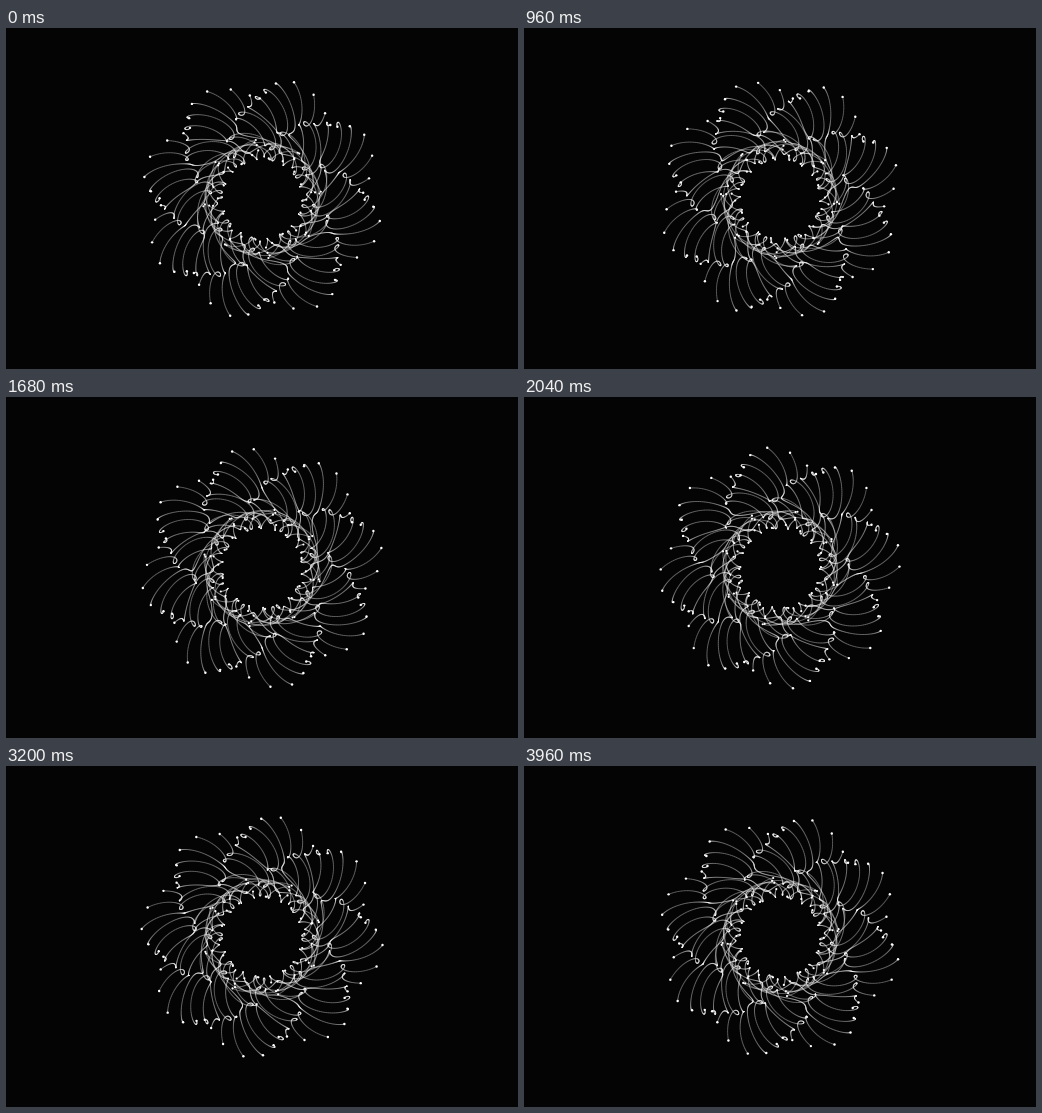
An HTML page with a canvas for the animation above (4 s loop, 512 px wide and 341 px high).

```html
<!DOCTYPE html>
<html lang="en">
<head>
<meta charset="utf-8">
<title>Orbiting threads</title>
<style>
  html, body { margin: 0; width: 100%; height: 100%; overflow: hidden; background: #040404; }
  canvas { display: block; width: 512px; height: 341px; }
</style>
</head>
<body>
<canvas id="stage" width="512" height="341"></canvas>
<script>
const ctx = document.getElementById('stage').getContext('2d');
const TAU = Math.PI * 2;
const LOOP = 4000, STEP = 40;
const THREADS = 50, WAVES = 8, SAMPLES = 400;
const DELAY = 2.5; // loops of lag between the two ends of a thread
const CENTER = { x: 256.1, y: 171 };
const rad = degrees => degrees * Math.PI / 180;

// Angles run clockwise from the top.
const polar = (radius, angle) => ({ x: radius * Math.sin(angle), y: -radius * Math.cos(angle) });

function outerEnd(base, phase) {
  const swing = 4.05 * Math.cos(phase - rad(132));
  return polar(110.8 + 10.2 * Math.cos(phase), base + rad(18 + swing));
}

// The inner end circles the opposite way, so threads curl inwards at the ring.
function innerEnd(base, phase) {
  const angle = base + rad(100);
  const hub = polar(50, angle);
  const orbit = polar(9.5, angle + rad(228) - phase);
  return { x: hub.x + orbit.x, y: hub.y + orbit.y };
}

function dot(point, radius) {
  ctx.beginPath();
  ctx.arc(point.x, point.y, radius, 0, TAU);
  ctx.fill();
}

function drawThread(base, phase) {
  ctx.fillStyle = 'rgba(255, 255, 255, 0.27)';
  for (let k = 0; k <= SAMPLES; k++) {
    const s = k / SAMPLES;
    const a = outerEnd(base, phase + TAU * DELAY * s);
    const b = innerEnd(base, phase + TAU * DELAY * (1 - s));
    ctx.fillRect(a.x + (b.x - a.x) * s - 0.5, a.y + (b.y - a.y) * s - 0.5, 1, 1);
  }
  ctx.fillStyle = '#fff';
  dot(outerEnd(base, phase), 1.2);
  dot(innerEnd(base, phase), 1.1);
}

function render(time) {
  const progress = Math.floor(time % LOOP / STEP) * STEP / LOOP;
  ctx.fillStyle = '#040404';
  ctx.fillRect(0, 0, 512, 341);
  ctx.save();
  ctx.translate(CENTER.x, CENTER.y);
  for (let i = 0; i < THREADS; i++) {
    const base = TAU * i / THREADS;
    drawThread(base, WAVES * base - TAU * progress);
  }
  ctx.restore();
}

function tick() {
  render(performance.now());
  requestAnimationFrame(tick);
}
tick();
</script>
</body>
</html>
```
